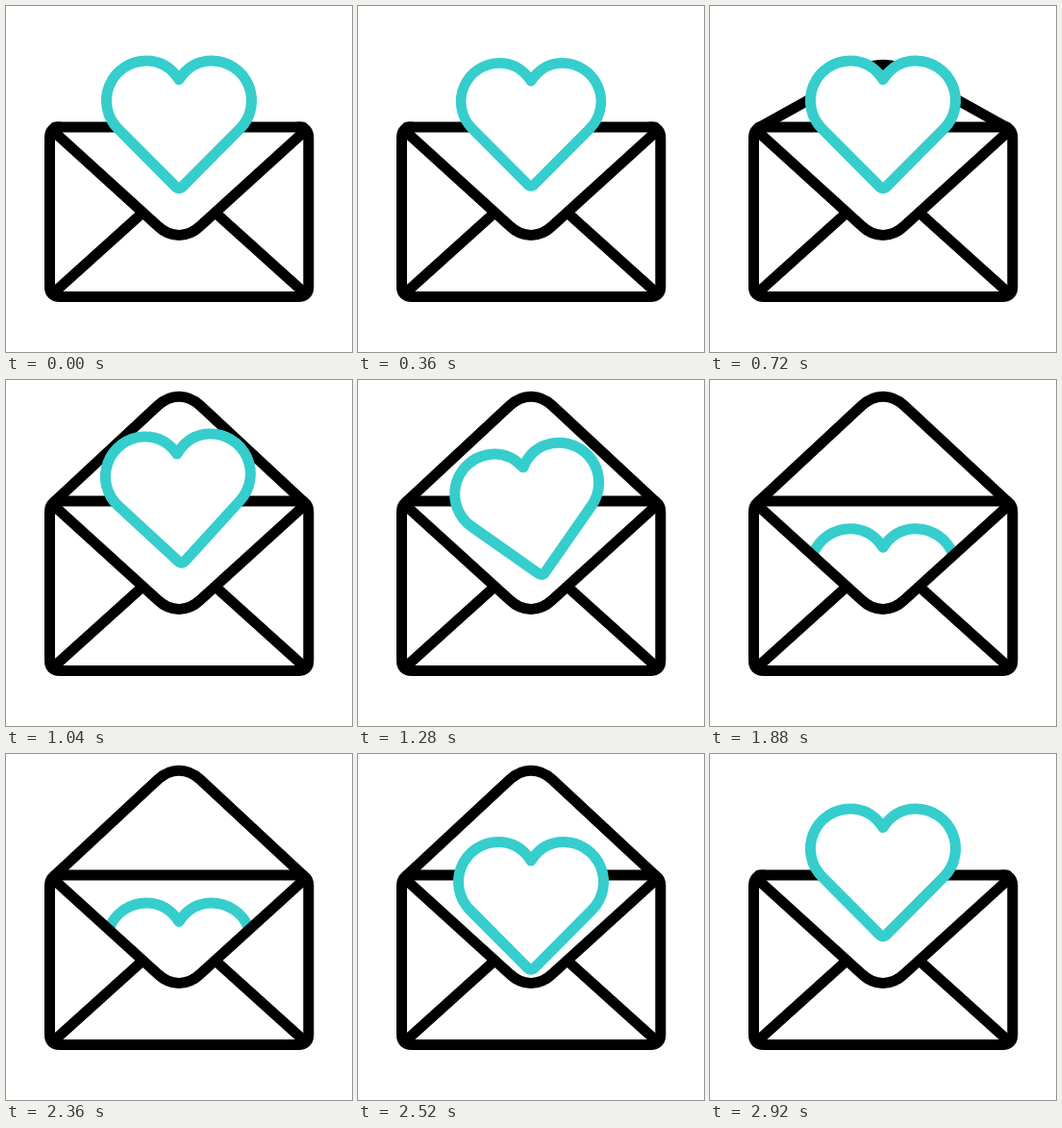
An HTML page for the animation above (3000 ms loop, 360 by 360 pixels).

```html
<!DOCTYPE html>
<html lang="en">
<head>
<meta charset="utf-8">
<title>Love letter</title>
<style>
  html, body { margin: 0; width: 100%; height: 100%; overflow: hidden; background: #fff; }
  svg { display: block; width: 100%; height: 100%; }
  path, rect { stroke: #000; stroke-width: 11; stroke-linecap: round; stroke-linejoin: round; fill: none; }
  #heart { stroke: #36cdcd; fill: #fff; }
  #pocket { fill: #fff; stroke: none; }
</style>
</head>
<body>
<svg viewBox="0 0 360 360">
  <path id="flap"/>
  <path d="M51 126H309"/>
  <path id="heart" d="M180 76.5C172 64 160 57 146 57A41.5 41.5 0 0 0 116.7 127.9L176 187.5Q180 192 184 187.5L243.3 127.9A41.5 41.5 0 0 0 214 57C200 57 188 64 180 76.5Z"/>
  <path id="pocket" d="M49 130L158 229C171 241.5 189 241.5 202 229L311 130V299H49Z"/>
  <path d="M49 130L158 229C171 241.5 189 241.5 202 229L311 130"/>
  <path d="M49 299L140 217M311 299L220 217"/>
  <path d="M56 126Q45.5 126 45.5 137V292Q45.5 302.5 56 302.5H304Q314.8 302.5 314.8 292V137Q314.8 126 304 126"/>
</svg>
<script>
  const LOOP = 3000, STEP = 40;
  const flap = document.getElementById('flap');
  const heart = document.getElementById('heart');

  const sine = u => (1 - Math.cos(Math.PI * u)) / 2;
  const cubic = u => u < 0.5 ? 4 * u ** 3 : 1 - 4 * (1 - u) ** 3;
  const easeOut = u => 1 - (1 - u) ** 2.6;
  const easeIn = u => u ** 3.6;

  // Each step is [time, value, easing towards this value].
  const tracks = {
    scale: [[160, 1], [360, 0.965, sine], [540, 1.04, sine], [720, 1, sine]],
    drop: [[920, 0], [2020, 98.5, cubic], [2320, 98.5, sine], [2680, 0, cubic]],
    tilt: [[920, 0], [1280, -10, sine], [1590, 8, sine], [1860, 0, sine]],
    open: [[680, 0], [820, 1.025, easeOut], [1000, 1, sine], [2690, 1, sine], [2920, 0, easeIn]]
  };

  function valueAt(steps, t) {
    if (t <= steps[0][0]) return steps[0][1];
    for (let i = 1; i < steps.length; i++) {
      const [t0, from] = steps[i - 1];
      const [t1, to, ease] = steps[i];
      if (t <= t1) return from + (to - from) * ease((t - t0) / (t1 - t0));
    }
    return steps[steps.length - 1][1];
  }

  function flapPath(open) {
    const y = depth => 127 - depth * open;
    return `M50 ${y(0)}L158 ${y(100.5)}C171 ${y(113)} 189 ${y(113)} 202 ${y(100.5)}L310 ${y(0)}`;
  }

  function draw(t) {
    const { scale, drop, tilt, open } = Object.fromEntries(
      Object.entries(tracks).map(([name, steps]) => [name, valueAt(steps, t)]));
    heart.setAttribute('transform',
      `translate(180 ${123.5 + drop}) rotate(${tilt}) scale(${scale}) translate(-180 -123.5)`);
    flap.setAttribute('d', open > 0.001 ? flapPath(open) : '');
  }

  let start;
  function tick(now) {
    start ??= now;
    draw(Math.floor((now - start) % LOOP / STEP) * STEP);
    requestAnimationFrame(tick);
  }
  draw(0);
  requestAnimationFrame(tick);
</script>
</body>
</html>
```
